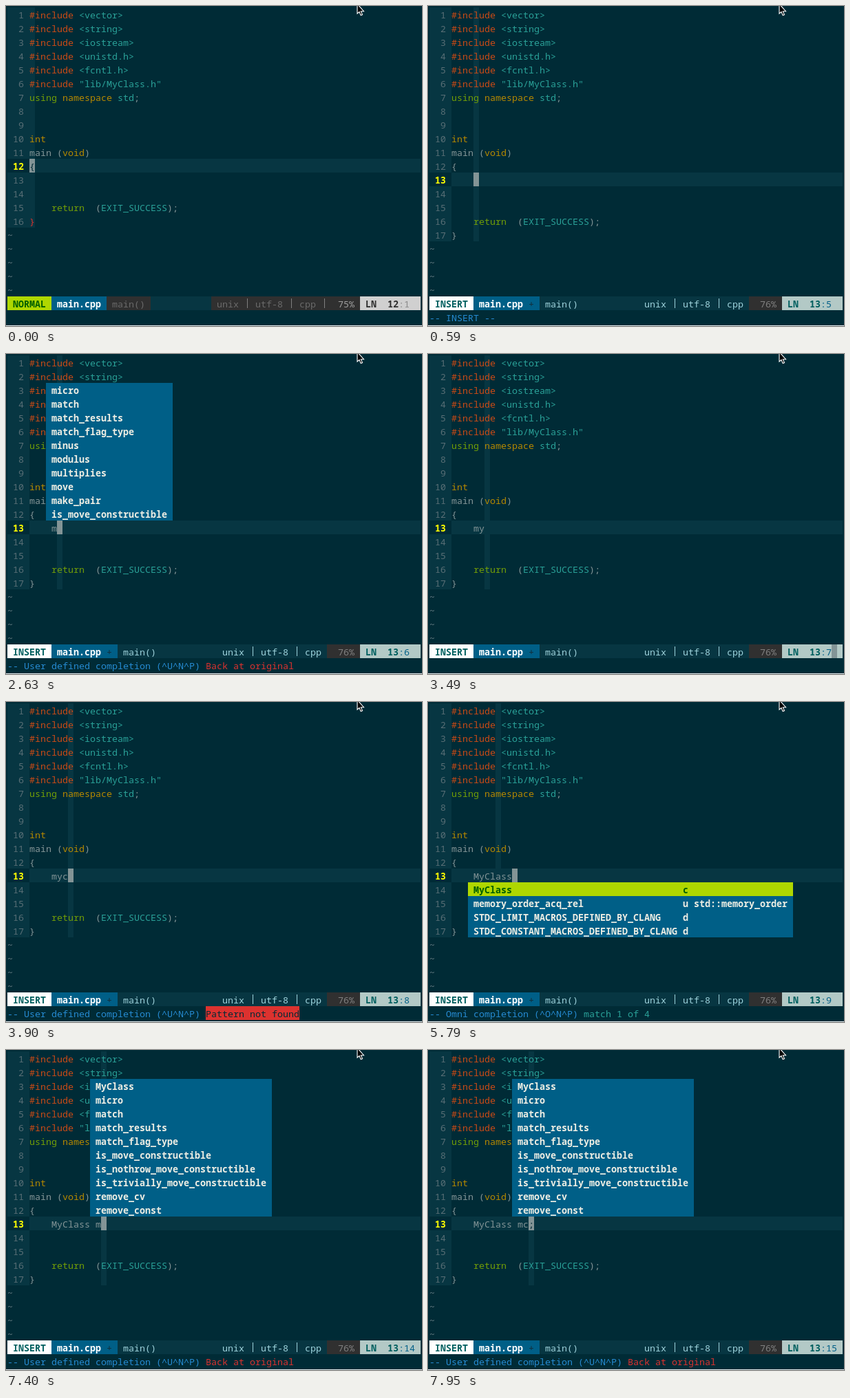
These frames come from a looping animation (604x465 px, 8 s). An HTML page with a canvas:

```html
<!DOCTYPE html>
<html lang="en">
<head>
<meta charset="utf-8">
<title>Editor completion</title>
<style>
html, body { margin: 0; width: 100%; height: 100%; overflow: hidden; background: #002b36; }
canvas { display: block; }
</style>
</head>
<body>
<canvas id="stage" width="604" height="465"></canvas>
<script>
(() => {
const ctx = document.getElementById('stage').getContext('2d');
const LOOP = 8000, CW = 8, CH = 20, PAD = 2, GUTTER = 4, COLS = 75;
const C = {
  bg: '#002b36', shade: '#073642', dim: '#586e75', text: '#839496',
  orange: '#cb4b16', cyan: '#2aa198', green: '#719e07', yellow: '#b58900',
  red: '#dc322f', blue: '#268bd2', lime: '#afd700', forest: '#005f00',
  menu: '#005f87', light: '#eeeee4', char: '#303030', ice: '#9fd3dc', teal: '#005f5f'
};

const include = name => [['#include ', C.orange], [name, C.cyan]];
const head = [
  ...['<vector>', '<string>', '<iostream>', '<unistd.h>', '<fcntl.h>', '"lib/MyClass.h"'].map(include),
  [['using ', C.green], ['namespace ', C.yellow], ['std', C.cyan], [';', C.text]],
  [], [],
  [['int', C.yellow]],
  [['main (', C.text], ['void', C.yellow], [')', C.text]],
  [['{', C.text]]
];
const tail = [
  [], [],
  [['    return  ', C.green], ['(', C.text], ['EXIT_SUCCESS', C.cyan], [');', C.text]]
];

const words = list => list.split(' ').map(name => [name]);
const menuM = words('micro match match_results match_flag_type minus modulus multiplies move make_pair is_move_constructible');
const menuMy = words('memory empty is_empty');
const menuMc = words('MyClass micro match match_results match_flag_type is_move_constructible ' +
  'is_nothrow_move_constructible is_trivially_move_constructible remove_cv remove_const');
const menuOmni = [
  ['MyClass', 'c'],
  ['memory_order_acq_rel', 'u', 'std::memory_order'],
  ['STDC_LIMIT_MACROS_DEFINED_BY_CLANG', 'd'],
  ['STDC_CONSTANT_MACROS_DEFINED_BY_CLANG', 'd']
];

const insertMsg = [['-- INSERT --', C.blue]];
const userMsg = ['-- User defined completion (^U^N^P) ', C.blue];
const omniMsg = ['-- Omni completion (^O^N^P) ', C.blue];
const notFound = [userMsg, ['Pattern not found', C.bg, C.red]];
const backMsg = [userMsg, ['Back at original', C.red]];

// Each step changes part of the state; cursor is [text column, row], col is the lit column.
const steps = [
  [0, { insert: false, typed: '', col: 0, cursor: [0, 12], pos: '1', msg: [], menu: null, pending: '' }],
  [550, { insert: true, col: 4, pos: '5', cursor: null, msg: insertMsg }],
  [590, { cursor: [4, 13] }],
  [2590, { typed: 'm', cursor: null }],
  [2630, { col: 5, pos: '6', cursor: [5, 13], menu: menuM, menuCol: 3, menuRow: 3, msg: backMsg }],
  [3490, { typed: 'my', col: 6, pos: '7', cursor: [69, 22], menu: null, msg: [] }],
  [3530, { cursor: [6, 13], menu: menuMy, menuRow: 14, msg: backMsg }],
  [3860, { typed: 'myc', cursor: null, menu: null }],
  [3900, { col: 7, pos: '8', cursor: [7, 13], msg: notFound }],
  [4670, { typed: 'mycl', cursor: null }],
  [4710, { col: 8, pos: '9', cursor: [8, 13] }],
  [5340, { pending: ';' }],
  [5520, { pending: '', cursor: [23, 23], msg: [omniMsg] }],
  [5750, { typed: 'MyClass', cursor: null, menu: menuOmni, menuRow: 14, chosen: 0 }],
  [5790, { cursor: [11, 13], msg: [omniMsg, ['match 1 of 4', C.cyan]] }],
  [6980, { typed: 'MyClass ', col: 12, pos: '13', cursor: [12, 13], menu: null, chosen: -1, msg: notFound }],
  [7360, { typed: 'MyClass m', cursor: null, msg: insertMsg }],
  [7400, { col: 13, pos: '14', cursor: [13, 13], menu: menuMc, menuCol: 11, menuRow: 3, msg: backMsg }],
  [7530, { typed: 'MyClass mc', cursor: null, menu: null }],
  [7570, { col: 14, pos: '15', cursor: [14, 13], menu: menuMc }],
  [7950, { pending: ';' }]
];

const colX = col => PAD + col * CW;
const rowY = row => PAD + (row - 1) * CH;

function fill(col, row, cols, rows, color) {
  ctx.fillStyle = color;
  ctx.fillRect(colX(col), rowY(row), cols * CW, rows * CH);
}

function write(str, col, row, color, bold) {
  ctx.font = (bold ? 'bold ' : '') + '13.333px "Noto Sans Mono", "DejaVu Sans Mono", monospace';
  ctx.fillStyle = color;
  [...str].forEach((ch, i) => {
    if (ch !== ' ') ctx.fillText(ch, colX(col + i), rowY(row) + 16);
  });
}

function writeRuns(runs, col, row) {
  for (const [str, color, back] of runs) {
    if (back) fill(col, row, str.length, 1, back);
    write(str, col, row, color);
    col += str.length;
  }
}

function drawCode(s) {
  const lines = [...head, ...(s.insert ? [[['    ' + s.typed, C.text]]] : []), ...tail,
    [['}', s.insert ? C.text : C.red]]];
  const current = s.insert ? 13 : 12;
  fill(0, 1, GUTTER, lines.length, C.shade);
  fill(GUTTER + s.col, 1, 1, lines.length, C.shade);
  fill(0, current, GUTTER, 1, C.bg);
  fill(GUTTER, current, COLS - GUTTER, 1, C.shade);
  lines.forEach((runs, i) => {
    const row = i + 1, on = row === current;
    write(String(row).padStart(3), 0, row, on ? '#ffff00' : C.dim, on);
    writeRuns(runs, GUTTER, row);
  });
  for (let row = lines.length + 1; row < 22; row++) write('~', 0, row, '#6c8188');
}

function drawStatus(s) {
  const on = s.insert, row = 22;
  const info = on ? C.ice : '#6a6a6a';
  const shift = on ? 1 : 0;
  fill(0, row, COLS, 1, C.shade);
  fill(0, row, 8, 1, on ? '#ffffff' : C.lime);
  write(on ? 'INSERT' : 'NORMAL', 1, row, on ? C.teal : C.forest, true);
  fill(8, row, on ? 12 : 10, 1, C.menu);
  write('main.cpp', 9, row, '#ffffff', true);
  if (on) write('+', 18, row, '#12303c');
  else {
    fill(18, row, 8, 1, C.char);
    fill(37, row, 21, 1, C.char);
  }
  write('main()', on ? 21 : 19, row, info);
  write('unix', 38 + shift, row, info);
  write('utf-8', 45 + shift, row, info);
  write('cpp', 53 + shift, row, info);
  ctx.fillStyle = on ? C.ice : '#808080';
  for (const col of on ? [44, 52] : [43, 51, 57]) ctx.fillRect(colX(col) + 4, rowY(row) + 3, 1, 14);
  fill(58, row, 6, 1, C.char);
  write(on ? '76%' : '75%', 60, row, on ? '#808080' : '#9e9e9e');
  fill(64, row, 11, 1, on ? '#b3c9c6' : '#d0d0d0');
  const ink = on ? C.teal : C.char;
  write('LN', 65, row, ink, true);
  write(on ? '13' : '12', 69, row, ink, true);
  write(':' + s.pos, 71, row, on ? C.menu : '#8a8a8a');
}

function drawMenu(s) {
  const longest = i => Math.max(0, ...s.menu.map(item => (item[i] || '').length));
  const nameW = longest(0), kindW = longest(1), noteW = longest(2);
  const width = Math.max(17, nameW + 2 + (kindW && kindW + 1) + (noteW && noteW + 1));
  const col = GUTTER + s.menuCol;
  s.menu.forEach(([name, kind = '', note = ''], i) => {
    const row = s.menuRow + i, chosen = i === s.chosen;
    const ink = chosen ? C.forest : C.light;
    fill(col, row, width, 1, chosen ? C.lime : C.menu);
    write(name, col + 1, row, ink, true);
    write(kind, col + nameW + 2, row, ink, true);
    write(note, col + nameW + 4, row, ink, true);
  });
}

function drawCursor(s) {
  const [col, row] = s.cursor;
  fill(GUTTER + col, row, 1, 1, C.text);
  write(s.insert ? s.pending : '{', GUTTER + col, row, C.bg);
}

function drawPointer() {
  const points = [[510, -3], [510, 11], [513, 8.5], [515.2, 13.6], [517.5, 12.6], [515.3, 7.7], [519.5, 7.7]];
  ctx.beginPath();
  points.forEach(([x, y]) => ctx.lineTo(x, y));
  ctx.closePath();
  ctx.fillStyle = '#000';
  ctx.fill();
  ctx.strokeStyle = '#fff';
  ctx.lineWidth = 1.1;
  ctx.stroke();
}

function draw(time) {
  const s = { chosen: -1 };
  for (const [at, change] of steps) if (at <= time) Object.assign(s, change);
  ctx.fillStyle = C.bg;
  ctx.fillRect(0, 0, 604, 465);
  ctx.fillStyle = '#e6e9ea';
  ctx.fillRect(0, 464, 604, 1);
  drawCode(s);
  drawStatus(s);
  writeRuns(s.msg, 0, 23);
  if (s.menu) drawMenu(s);
  if (s.cursor) drawCursor(s);
  drawPointer();
}

const start = performance.now();
function tick() {
  draw((performance.now() - start) % LOOP);
  requestAnimationFrame(tick);
}
tick();
})();
</script>
</body>
</html>
```
